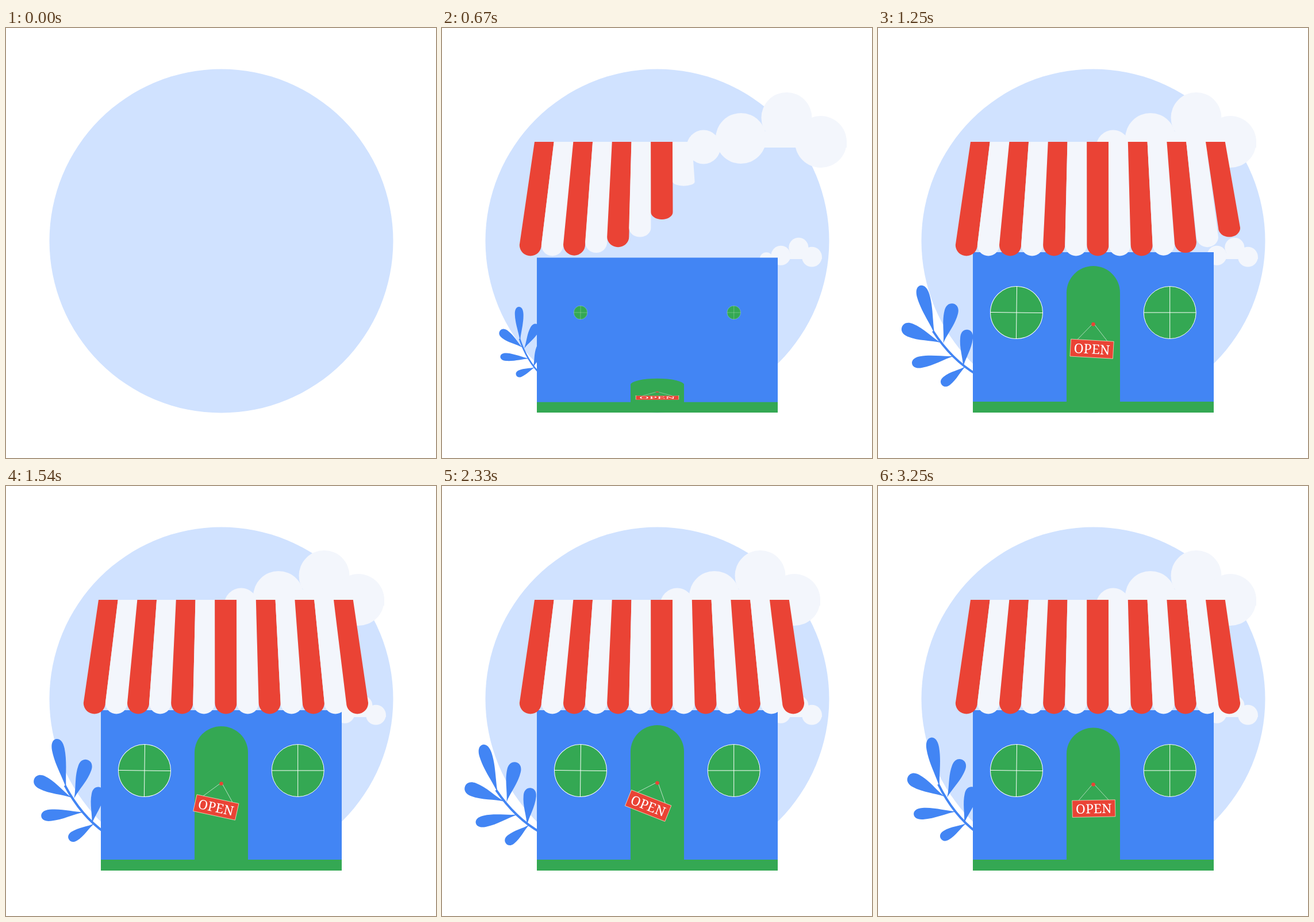
An HTML page that plays this animation: 748 by 748 pixels, repeating every 3.29 s.

```html
<!DOCTYPE html>
<html lang="en">
<head>
<meta charset="utf-8">
<title>Little shop</title>
<style>
  html, body { margin: 0; width: 100%; height: 100%; overflow: hidden; background: #fff; }
  svg { display: block; width: 100vw; height: 100vh; }
</style>
</head>
<body>
<svg viewBox="0 0 748 748">
  <defs>
    <g id="cloud" fill="#f3f6fc">
      <circle cx="409" cy="207" r="29.5"/>
      <circle cx="474" cy="192" r="44"/>
      <circle cx="553.5" cy="156" r="44"/>
      <circle cx="613" cy="198" r="45"/>
      <path d="M380 207H409V198H474V180H613V198H658V208H380Z"/>
    </g>
    <g id="pane" fill="#34a853" stroke="#fff">
      <circle r="45.5"/>
      <path d="M-45.5 0H45.5M0 -45.5V45.5"/>
    </g>
  </defs>
  <circle cx="374.5" cy="370.5" r="299" fill="#d0e2ff"/>
  <use id="bigCloud" href="#cloud"/>
  <use id="smallCloud" href="#cloud"/>
  <g id="plant" fill="#4285f4">
    <path d="M172 603Q128 578 95 528" fill="none" stroke="#4285f4" stroke-width="4"/>
  </g>
  <g id="house">
    <path d="M165 390H584V669H165Z" fill="#4285f4"/>
    <path d="M165 650H584V669H165Z" fill="#34a853"/>
  </g>
  <use id="leftPane" href="#pane"/>
  <use id="rightPane" href="#pane"/>
  <g id="door">
    <path d="M328 669V460A46.5 46.5 0 0 1 421 460V669Z" fill="#34a853"/>
    <g id="sign">
      <path d="M-26 28L0 -2L26 28" fill="none" stroke="#cfe8d5" stroke-width=".8"/>
      <circle r="3.3" fill="#ea4335"/>
      <rect x="-37.3" y="28" width="74.6" height="30" fill="#ea4335" stroke="#f3d9c0" stroke-width=".8"/>
      <text y="51.5" fill="#fff" text-anchor="middle" font-size="23" font-family="'Noto Serif', serif">OPEN</text>
    </g>
  </g>
  <g id="awning"></g>
</svg>
<script>
const LOOP = 3290, FRAMES = 79, STRIPES = 13;
const el = id => document.getElementById(id);
const move = (node, value) => node.setAttribute('transform', value);
const clamp = x => Math.min(1, Math.max(0, x));
const smooth = s => s * s * (3 - 2 * s);
const ease = (n, start, length) => smooth(clamp((n - start) / length));

function addPath(parent, d, fill) {
  const path = document.createElementNS('http://www.w3.org/2000/svg', 'path');
  path.setAttribute('d', d);
  if (fill) path.setAttribute('fill', fill);
  parent.append(path);
  return path;
}

// cubic-bezier(.14, 0, .045, 1)
function snap(u) {
  if (u <= 0 || u >= 1) return clamp(u);
  let lo = 0, hi = 1;
  for (let i = 0; i < 24; i++) {
    const s = (lo + hi) / 2, r = 1 - s;
    if (.42 * r * r * s + .135 * r * s * s + s ** 3 < u) lo = s; else hi = s;
  }
  return smooth(lo);
}

// leaves: base x, y, tip x, y, half width
for (const [x, y, tx, ty, w] of [
  [98, 534, 72, 449, 11], [109, 548, 41, 521, 12], [113, 549, 130, 480, 12],
  [132, 571, 59, 585, 10], [148, 590, 155, 525, 11], [152, 589, 111, 621, 9]
]) {
  const leaf = addPath(el('plant'), 'M0 0C.25 -.2 .5 -1 .79 -1C.93 -1 1 -.55 1 0C1 .55 .93 1 .79 1C.5 1 .25 .2 0 0Z');
  const turn = Math.atan2(ty - y, tx - x) * 180 / Math.PI;
  move(leaf, `translate(${x} ${y}) rotate(${turn}) scale(${Math.hypot(tx - x, ty - y)} ${w})`);
}

// stripes hang down from y = 0
const top_ = i => i < 7 ? 161 + 33.7 * i : 401 + 33.8 * (i - 7);
const low = i => 134.8 + 38.1 * i;
const stripes = Array.from({ length: STRIPES }, (_, i) => addPath(el('awning'),
  `M${top_(i)} 0H${top_(i + 1)}L${low(i + 1)} 179.5A19.05 19 0 0 1 ${low(i)} 179.5Z`,
  i % 2 ? '#f3f6fc' : '#ea4335'));

// n counts steps of 1/24 s
function draw(n) {
  const glide = (span, from, power) => from * (1 - clamp(n / span)) ** power;
  const wave = peak => smooth(Math.abs(((n - peak + 36) % 36) / 18 - 1));

  move(el('bigCloud'), `translate(${glide(26, 932, 3.15)} 0)`);
  move(el('smallCloud'), `translate(${553 + glide(16, 551, 3)} 402) scale(.388) translate(-380 -208)`);

  const grown = ease(n, 3, 21);
  const lean = n < 24 ? 50 - 51.8 * grown : 7.2 - 9 * wave(24);
  move(el('plant'), `translate(172 603) rotate(${lean}) scale(${grown}) translate(-172 -603)`);

  move(el('house'), `translate(0 669) scale(1 ${ease(n, 0, 18)}) translate(0 -669)`);

  const pane = ease(n, 10, 18);
  move(el('leftPane'), `translate(241 495) rotate(.7) scale(${pane})`);
  move(el('rightPane'), `translate(507.7 495) scale(${pane})`);

  const tall = n < 27 ? ease(n, 11, 16) : .97 + .03 * wave(27);
  move(el('door'), `translate(0 669) scale(1 ${tall}) translate(0 -669)`);
  const swing = n < 27.7 ? 0 : 22.2 * Math.sin((n - 27.7) / 49.5 * Math.PI);
  move(el('sign'), `translate(374.5 515) rotate(${swing})`);

  stripes.forEach((stripe, i) =>
    move(stripe, `translate(0 198) scale(1 ${snap((n - 2 * i) / 13.4)})`));
}

const begin = performance.now();
function tick() {
  const time = (performance.now() - begin) % LOOP;
  draw(Math.min(FRAMES - 1, Math.floor(time * FRAMES / LOOP + .1)));
  requestAnimationFrame(tick);
}
tick();
</script>
</body>
</html>
```
